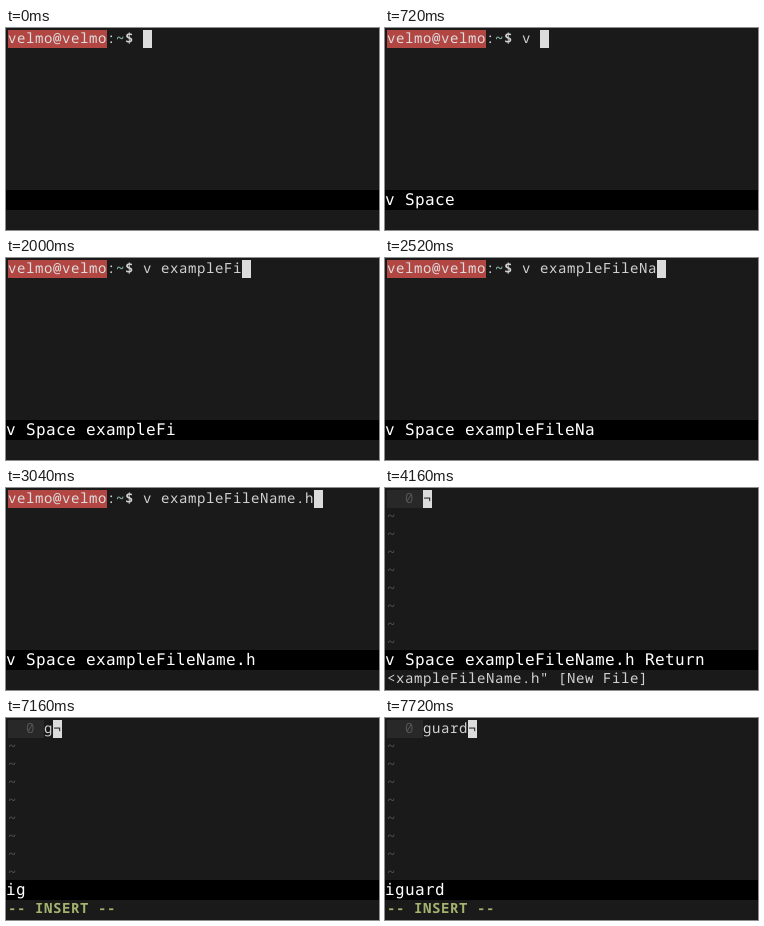
Animation, 373 px wide and 202 px high, one loop 8000 ms. Source, as an HTML page:

```html
<!DOCTYPE html>
<html lang="en">
<head>
<meta charset="utf-8">
<title>Terminal session</title>
<style>
html, body { margin: 0; width: 100%; height: 100%; overflow: hidden; background: #1a1a1a; }
#stage { position: relative; width: 373px; height: 202px; overflow: hidden; background: #1a1a1a; text-rendering: geometricPrecision; }
#stage div { position: absolute; white-space: pre; }
.row {
  left: 2px; height: 18px; color: #d2d2d2;
  font: 14px/18px "Noto Sans Mono", "DejaVu Sans Mono", monospace;
  letter-spacing: calc(9px - 1ch);
}
.row span { display: inline-block; height: 18px; vertical-align: top; }
#keys {
  left: 0; top: 162px; width: 373px; height: 20px; background: #000; color: #fff;
  font: 16px/20px "DejaVu Sans Mono", monospace;
  letter-spacing: calc(10px - 1ch);
}
.user { background: #b14643; color: #dedede; }
.path { color: #86b5aa; font-weight: bold; }
.sign { font-weight: bold; }
.cursor { background: #dcdcdc; color: #1a1a1a; }
.num { background: #282828; color: #545454; }
.tilde { color: #555; }
.mode { color: #a3b46e; font-weight: bold; }
</style>
</head>
<body>
<div id="stage"></div>
<script>
const LOOP = 8000;
const COMMAND = "v exampleFileName.h";
// time at which each character of the command appears
const COMMAND_AT = [560, 720, 960, 1200, 1280, 1360, 1440, 1480, 1520, 1840,
  2000, 2040, 2120, 2400, 2520, 2640, 2720, 2840, 3040];
const RETURN_AT = 4080, CLEAR_AT = 4120, EDITOR_AT = 4160;
const KEYS_OFF = 5840, INSERT_AT = 6560;
const WORD = "guard";
const WORD_KEYS = [7160, 7280, 7480, 7600, 7680];
const WORD_AT = [7160, 7280, 7480, 7600, 7720];

const stage = document.getElementById("stage");

function add(className, id) {
  const el = document.createElement("div");
  el.className = className;
  if (id) el.id = id;
  return stage.appendChild(el);
}

const rows = Array.from({ length: 11 }, (_, i) => {
  const el = add("row");
  el.style.top = 2 + i * 18 + "px";
  return el;
});
const keys = add("", "keys");

const span = (cls, text) => `<span class="${cls}">${text}</span>`;
const typed = (text, times, t) => text.slice(0, times.filter(at => at <= t).length);

const PROMPT = span("user", "velmo@velmo") + ":" + span("path", "~") + span("sign", "$") + " ";
const BLANK = span("cursor", " ");

function shell(t) {
  const line = PROMPT + typed(COMMAND, COMMAND_AT, t);
  return t < RETURN_AT ? [line + BLANK] : [line, BLANK];
}

function editor(t) {
  const lines = Array(11).fill("");
  lines[0] = span("num", "  0 ") + typed(WORD, WORD_AT, t) + span("cursor", "¬");
  lines.fill(span("tilde", "~"), 1, 9);
  lines[10] = t < INSERT_AT
    ? "&lt;xampleFileName.h\" [New File]"
    : span("mode", "-- INSERT --");
  return lines;
}

function screen(t) {
  if (t < CLEAR_AT) return shell(t);
  return t < EDITOR_AT ? [BLANK] : editor(t);
}

function keyText(t) {
  if (t >= INSERT_AT) return "i" + typed(WORD, WORD_KEYS, t);
  if (t >= KEYS_OFF) return "";
  const text = typed(COMMAND, COMMAND_AT, t).replace(" ", " Space ");
  return t < RETURN_AT ? text : text + " Return";
}

function put(el, html) {
  if (el.shown !== html) el.innerHTML = el.shown = html;
}

function draw(t) {
  const lines = screen(t);
  rows.forEach((row, i) => put(row, lines[i] || ""));
  put(keys, keyText(t));
}

const start = performance.now();
function tick(now) {
  draw(Math.max(0, now - start) % LOOP);
  requestAnimationFrame(tick);
}
draw(0);
requestAnimationFrame(tick);
</script>
</body>
</html>
```
